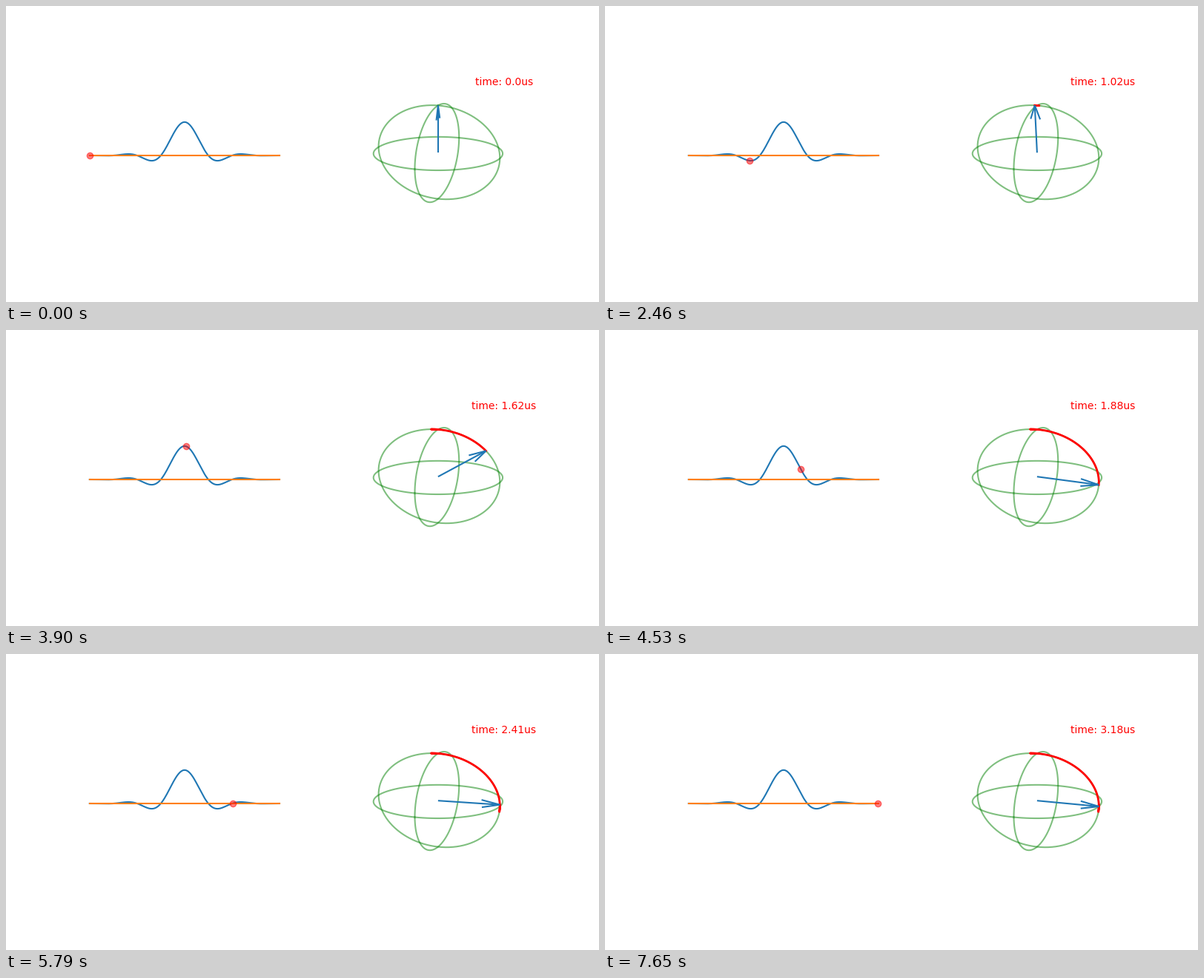
Animation, 800 px wide and 400 px high, one loop 7680 ms. Source, as a matplotlib script:

```python
import numpy as np
import matplotlib.pyplot as plt
from matplotlib.animation import FuncAnimation

FRAMES = 256
DURATION = 3.2
GAMMA = 4257.7  # Hz per gauss

# Hann-windowed sinc pulse scaled to a 90 degree flip
u = np.linspace(-4, 4, FRAMES + 1)
shape = np.sinc(u) * 0.5 * (1 + np.cos(np.pi * u / 4))
dt = DURATION * 1e-3 / FRAMES
b1 = shape * (np.pi / 2) / (2 * np.pi * GAMMA * dt * shape.sum())
step = 2 * np.pi * GAMMA * dt * b1
flip = np.cumsum(step) - step / 2
flip[0] = 0
time = np.linspace(0, DURATION, FRAMES + 1)

fig = plt.figure(figsize=(8, 4), dpi=100)

pulse = fig.add_subplot(121)
pulse.plot(time, b1)
pulse.plot(time, np.zeros_like(time))
pulse.set_xlim(-0.05 * DURATION, 1.05 * DURATION)
pulse.set_ylim(-0.5, 0.5)
pulse.axis("off")
dot, = pulse.plot([], [], "ro", alpha=0.5)

ball = fig.add_subplot(122, projection="3d")
ball.view_init(elev=15, azim=20)
lim = 25 / 24
ball.set(xlim=(-lim, lim), ylim=(-lim, lim), zlim=(-lim, lim))
ball.axis("off")

a = np.linspace(0, 2 * np.pi, 101)
c, s, o = np.cos(a), np.sin(a), np.zeros_like(a)
for ring in ((c, s, o), (o, s, c), (s, o, c)):
    ball.plot(*ring, color="g", alpha=0.5)
trail, = ball.plot([], [], [], color="r", lw=2)
label = fig.text(0.84, 0.7325, "", color="r", ha="center")
arrows = []


def update(i):
    dot.set_data([time[i]], [b1[i]])
    path = flip[:i + 1]
    trail.set_data_3d(0 * path, np.sin(path), np.cos(path))
    while arrows:
        arrows.pop().remove()
    arrows.append(ball.quiver(0, 0, 0, 0, np.sin(flip[i]), np.cos(flip[i]),
                              arrow_length_ratio=0.3, color="C0"))
    label.set_text(f"time: {i * 5 // 4 / 100}us")
    return dot, trail, label, arrows[0]


anim = FuncAnimation(fig, update, frames=FRAMES, interval=30, repeat=True,
                     repeat_delay=0, init_func=lambda: update(0))
plt.show()
```
